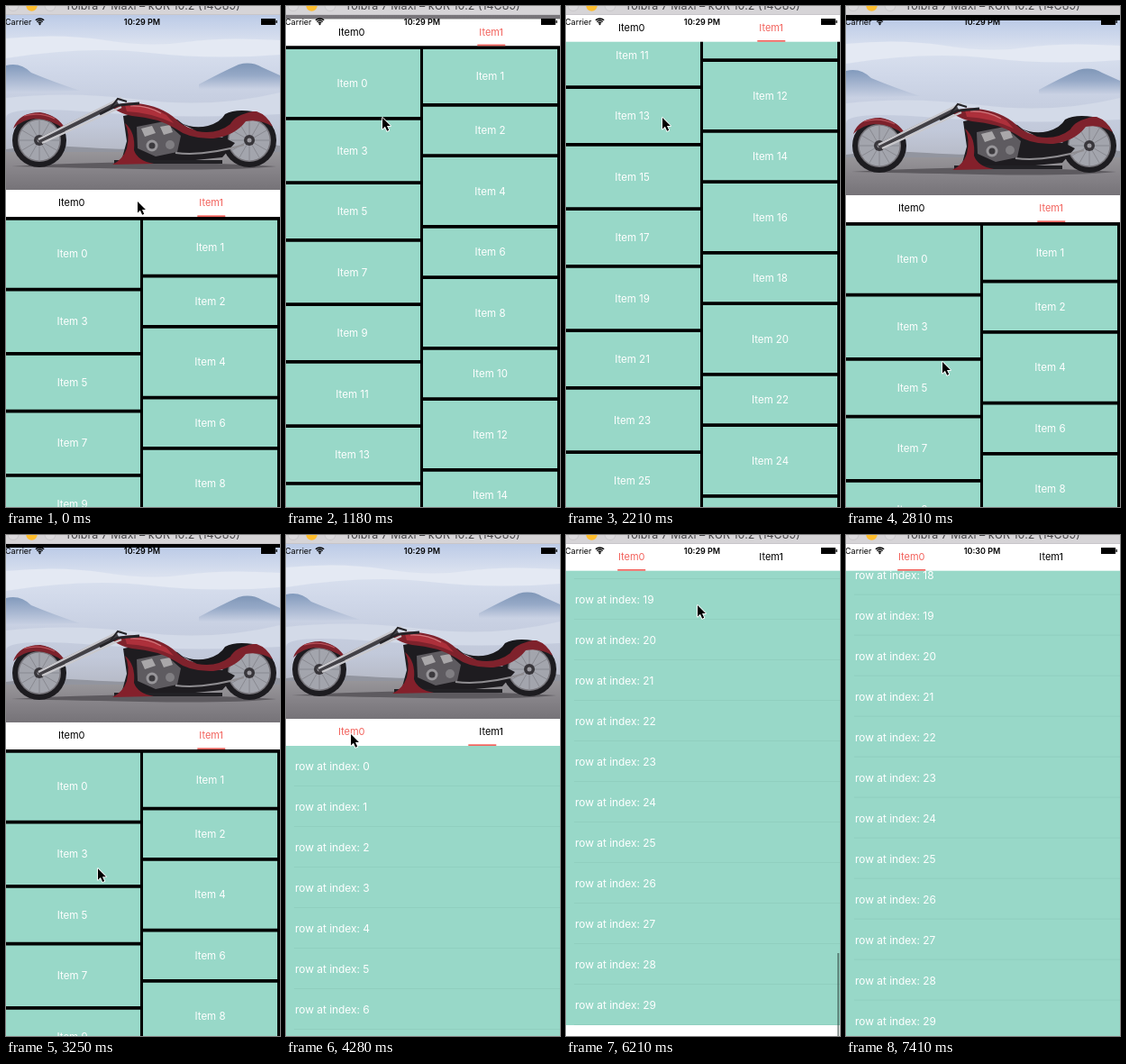
Recreate the animation shown at these times as an HTML page with a canvas. Size 304x556 px, loop 7.85 s.

```html
<!DOCTYPE html>
<html lang="en">
<head>
<meta charset="utf-8">
<title>Scrolling tabs</title>
<style>
  html, body { margin: 0; width: 100%; height: 100%; overflow: hidden; background: #000; }
  canvas { display: block; width: 304px; height: 556px; }
</style>
</head>
<body>
<canvas id="stage"></canvas>
<script>
const W = 304, H = 556, LOOP = 7850, STEP = 147.7, LAST = 50;
const MINT = '#98d8c8', RED = '#f2635d', FONT = 'Inter, Roboto, sans-serif';
const canvas = document.getElementById('stage');
const ctx = canvas.getContext('2d');
const ratio = window.devicePixelRatio || 1;
canvas.width = W * ratio;
canvas.height = H * ratio;

// Keyframes: [step, value, ...]; time is counted in screen refresh steps.
const CURSOR = [
  [0, 146, 217], [1, 128, 237], [2, 107, 257], [3, 102, 263], [5, 102, 263],
  [6, 106, 241], [7, 107, 138], [8, 107, 124], [15, 107, 124], [16, 107, 201],
  [17, 107, 395], [21, 107, 395], [28, 72, 221], [33, 72, 221], [34, 94, 309],
  [35, 120, 396], [36, 120, 396], [37, 120, 411], [38, 120, 411], [39, 122, 373],
  [40, 137, 176], [41, 146, 78]
];
const CURSOR_GONE = 48;
const DRAG_UP = [[5, 0], [6, 22], [7, 125], [8, 189.75]];
const DRAG_DOWN = [
  [15, 565.75], [16, 489], [17, 295], [18, 100], [19, -6], [20, -16],
  [21, -10], [22, -4], [23, -1], [24, 0]
];
const ROW_FLING = [[38, 0], [39, 38], [40, 235], [41, 640], [42, 1040], [43, 1050]];
const ROW_END = 1022;
const TAB_SLIDE = [[28, 227.8], [29, 217.8], [30, 118], [31, 72.7]];

function track(keys, k) {
  if (k <= keys[0][0]) return keys[0].slice(1);
  for (let i = 1; i < keys.length; i++) {
    const a = keys[i - 1], b = keys[i];
    if (k <= b[0]) {
      const f = (k - a[0]) / (b[0] - a[0]);
      return a.slice(1).map((v, j) => v + (b[j + 1] - v) * f);
    }
  }
  return keys[keys.length - 1].slice(1);
}

function scrollAt(k) {
  if (k <= 8) return track(DRAG_UP, k)[0];
  if (k < 15) {
    const settle = x => 1 - Math.exp(-x / 3.385);
    return 189.75 + 376 * settle(k - 8) / settle(7);
  }
  if (k < 29) return track(DRAG_DOWN, k)[0];
  if (k <= 43) return track(ROW_FLING, k)[0];
  return ROW_END + 28 * Math.exp(-(k - 43) / 1.6);
}

function rect(color, x, y, w, h) {
  ctx.fillStyle = color;
  ctx.fillRect(x, y, w, h);
}

function text(str, x, y, size, color, align = 'center', weight = 400) {
  ctx.font = `${weight} ${size}px ${FONT}`;
  ctx.textAlign = align;
  ctx.textBaseline = 'alphabetic';
  ctx.fillStyle = color;
  ctx.fillText(str, x, y);
}

function fill(color, d) {
  ctx.fillStyle = color;
  ctx.fill(new Path2D(d));
}

function line(color, width, d) {
  ctx.strokeStyle = color;
  ctx.lineWidth = width;
  ctx.stroke(new Path2D(d));
}

function disc(color, x, y, r) {
  ctx.fillStyle = color;
  ctx.beginPath();
  ctx.arc(x, y, r, 0, 7);
  ctx.fill();
}

function gradient(y0, y1, colors) {
  const g = ctx.createLinearGradient(0, y0, 0, y1);
  colors.forEach((c, i) => g.addColorStop(i / (colors.length - 1), c));
  return g;
}

function wheel(x, y) {
  disc('#1d1c20', x, y, 30);
  disc('#77757b', x, y, 24);
  disc('#a3a5ad', x, y, 22.5);
  for (let i = 0; i < 12; i++) {
    const a = i * Math.PI / 6;
    line('#7d7d84', 0.7, `M${x} ${y}l${22 * Math.cos(a)} ${22 * Math.sin(a)}`);
  }
  disc('#38363b', x, y, 6);
  disc('#9a999f', x, y, 2.5);
}

function photo() {
  rect(gradient(10, 162, ['#bccbe7', '#dae1ef', '#d0d8e9', '#c7cfe1', '#c2c9da', '#b6bac6']), 0, 10, W, 153);
  fill('#e4e9f3', 'M0 36Q60 30 110 38T200 40T304 38V54Q230 60 160 52T0 58Z');
  fill(gradient(64, 96, ['#7f98bb', '#a4b4cf', '#c9d1e3']), 'M0 66Q16 62 28 74Q52 84 82 94L0 96Z');
  fill(gradient(62, 92, ['#7d95b6', '#96a9c7', '#c9d1e3']), 'M214 87Q238 74 258 65Q272 61 284 68L304 77V92H214Z');
  fill('#d3daE8', 'M0 102Q70 94 150 104T304 96V120Q200 126 100 118T0 124Z');
  fill('#92959f', 'M0 159Q40 153 90 157T210 156T304 155V166H0Z');
  rect(gradient(161, 204, ['#98969a', '#868388', '#767378']), 0, 162, W, 42);
  fill('#5d5a5f', 'M6 178Q150 169 300 178Q250 183 150 181T6 178Z');

  wheel(37, 149);
  wheel(270, 149);
  fill('#7d222c', 'M8 136Q14 118 38 118Q58 121 67 138Q50 125 32 125Q18 126 8 136Z');
  line('#b8515a', 1.2, 'M20 122Q38 117 54 125');

  fill('#1e1c20', 'M130 122L150 118L190 126L210 142L242 146L254 152L240 168L200 172L128 172L134 150Z');
  fill('#5e5b60', 'M145 134L176 128L194 144L190 162L166 167L146 158Z');
  fill('#a9a7a9', 'M150 136l12 -3l4 8l-12 4ZM171 134l11 -2l3 8l-10 3Z');
  disc('#98969a', 162, 155, 6.5);
  disc('#3b393d', 162, 155, 3.5);
  disc('#807e82', 182, 154, 5);
  line('#8f8d91', 2, 'M188 163Q220 167 264 154');
  line('#222125', 4, 'M120 173H240');
  fill('#84202b', 'M132 130Q138 142 134 158Q130 170 118 176L164 175Q146 172 142 160Q144 140 132 130Z');

  fill('#7f222c', 'M118 113Q128 106 146 108Q172 111 188 125Q200 138 222 139Q238 138 246 126Q258 116 278 117Q290 121 296 134Q282 125 266 128Q254 144 230 147Q204 148 188 136Q168 124 140 122Q128 120 118 113Z');
  fill('#ad303b', 'M132 110Q156 108 178 121L186 130Q160 118 134 117Z');
  line('#d0767c', 1.2, 'M138 111Q156 110 172 119');
  fill('#19181b', 'M192 129Q208 137 224 133Q238 129 243 120Q254 114 274 117Q254 121 249 131Q234 143 212 139Z');

  line('#434146', 6, 'M36 150L124 107');
  line('#c9c8cc', 2.4, 'M36 148L128 102M40 152L128 112');
  line('#242327', 2.8, 'M104 120L124 110L148 108');
  line('#242327', 2, 'M116 113L124 103L134 106');
}

const black = (x, y, w, h) => rect('#000', x, y, w, h);

function cell(n, x, top, w, h) {
  if (top > H || top + h < 10) return;
  rect(MINT, x, top, w, h);
  text('Item ' + n, x + w / 2, top + h / 2 + 4.2, 11.5, '#fff');
}

function grid(top) {
  black(0, top, W, H);
  const gap = 3.75;
  let left = top + gap, right = top + gap;
  const addLeft = (n, h) => { cell(n, -2, left, 151, h); left += h + gap; };
  const addRight = (n, h) => { cell(n, 152, right, 149, h); right += h + gap; };
  addLeft(0, 75);
  addRight(1, 60);
  for (let i = 0; i < 18; i++) {
    addLeft(2 * i + 3, i % 2 ? 60 : 67.5);
    addRight(2 * i + 2, i % 2 ? 75 : 52.5);
  }
}

function rows(top) {
  rect('#fff', 0, top, W, 3000);
  rect(MINT, 0, top, W, 30 * 45);
  for (let i = 0; i < 30; i++) {
    const y = top + i * 45;
    if (y > H || y < -45) continue;
    text('row at index: ' + i, 10, y + 27, 11.9, '#fff', 'left');
    rect('rgba(60,100,90,.08)', 9, y + 44, W, 1);
  }
}

function tabs(y, k) {
  const first = k >= 29;
  rect('#fff', 0, y, W, 30);
  text('Item0', 72.7, y + 18.3, 11, first ? RED : '#000');
  text('Item1', 227.7, y + 18.3, 11, first ? '#000' : RED);
  rect(RED, track(TAB_SLIDE, k)[0] - 15.5, y + 28.3, 31, 1.7);
}

function statusBar(k) {
  text('Carrier', -1, 21, 9, '#000', 'left');
  text(k >= 48 ? '10:30 PM' : '10:29 PM', 151, 21, 9, '#000', 'center', 600);
  ctx.strokeStyle = '#000';
  ctx.lineWidth = 1.4;
  [2.6, 4.8, 7].forEach(r => {
    ctx.beginPath();
    ctx.arc(37.5, 21, r, -2.3, -0.84);
    ctx.stroke();
  });
  disc('#000', 37.5, 20.2, 1);
  black(283, 14, 16, 7);
  black(299.5, 16, 1.3, 3);
}

function titleBar() {
  rect('#d6d4d7', 0, 0, W, 10);
  rect('#c3c1c4', 0, 9.3, W, 0.7);
  [8, 49].forEach(x => {
    disc('#c6c4c7', x, -0.5, 6.3);
    disc('#dcdadd', x, -0.5, 5.6);
  });
  disc('#fdbd2e', 28.5, -0.5, 6.2);
  text('Tolbra 7 Maxi – kUR 10.2 (14C89)', 162.5, 4, 12.5, '#444346');
}

function pointer(x, y) {
  ctx.save();
  ctx.translate(x, y);
  ctx.scale(0.86, 0.86);
  const d = 'M0 0V14.6L3.4 11.4L6 17.2L8.4 16.1L5.8 10.6H10.4Z';
  ctx.lineJoin = 'round';
  line('#fff', 2, d);
  fill('#000', d);
  ctx.restore();
}

function draw(k) {
  const s = scrollAt(k);
  ctx.setTransform(ratio, 0, 0, ratio, 0, 0);
  black(0, 0, W, H);
  if (s < 200) {
    ctx.save();
    ctx.translate(0, -s);
    ctx.beginPath();
    ctx.rect(0, 10, W, 194);
    ctx.clip();
    photo();
    ctx.restore();
  }
  (k < 29 ? grid : rows)(234 - s);
  tabs(Math.max(9.7, 204 - s), k);
  if (k >= 39 && k < 49) {
    const alpha = 0.5 * Math.min(1, (49 - k) / 3);
    rect(`rgba(40,60,55,${alpha})`, 301, 40 + 424 * Math.min(1, s / ROW_END), 2.2, 97);
  }
  statusBar(k);
  titleBar();
  if (k < CURSOR_GONE) pointer(...track(CURSOR, k));
}

let shown = -1;
const start = performance.now();
function tick() {
  const t = (performance.now() - start) % LOOP;
  const k = Math.min(LAST, Math.floor(t / STEP + 0.08));
  if (k !== shown) draw(shown = k);
  requestAnimationFrame(tick);
}
tick();
</script>
</body>
</html>
```
